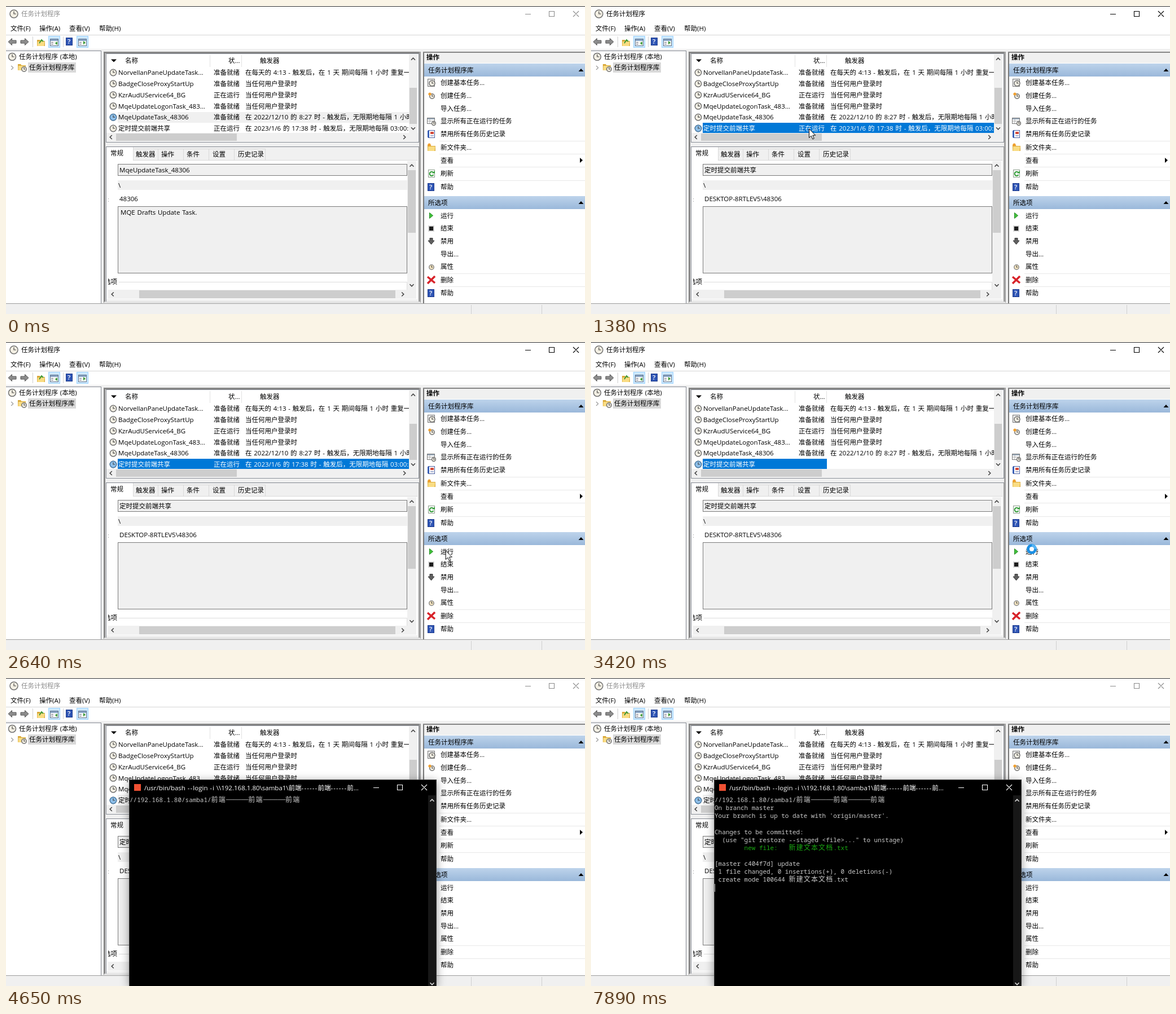
An HTML page for the animation above (8000 ms loop, 1026x546 px).

```html
<!DOCTYPE html>
<html lang="zh-CN">
<head>
<meta charset="utf-8">
<title>任务计划程序</title>
<style>
html, body { margin: 0; width: 100%; height: 100%; overflow: hidden; background: #fff; }
svg { display: block; width: 1026px; height: 546px; }
text { font: 11.5px "Open Sans", "Noto Sans CJK SC", "Noto Sans CJK", sans-serif; word-spacing: .8px; white-space: pre; }
.bold { font-weight: 600; }
.term text { font: 500 10.96px "Noto Sans Mono", "DejaVu Sans Mono", "Noto Sans CJK SC", "Noto Sans CJK", monospace; word-spacing: 0; }
.wide { font-size: 12px; letter-spacing: 1.15px; }
.dash { letter-spacing: 1.1px; }
.shadow { filter: drop-shadow(0 3px 8px rgba(0, 0, 0, .4)); }
.on { animation: 8s step-end infinite; }
#mouse { animation: mouse 8s linear infinite; }
@keyframes mouse {
  0%, 6% { transform: translate(1016px, 1px); animation-timing-function: cubic-bezier(.3, .1, .35, 1); }
  15.75%, 21.3% { transform: translate(386px, 217px); animation-timing-function: cubic-bezier(.4, 0, .6, .9); }
  27% { transform: translate(743px, 309px); animation-timing-function: cubic-bezier(.2, .5, .5, 1); }
  31.125%, 31.6% { transform: translate(787px, 378px); }
  34.125%, 36.2% { transform: translate(772px, 362px); }
  37.875%, 49.2% { transform: translate(780px, 367px); animation-timing-function: ease-in; }
  50.625%, 100% { transform: translate(930px, 548px); }
}
</style>
</head>
<body>
<svg id="stage" viewBox="0 0 1026 546"></svg>
<script>
const LOOP = 8000;
const sheet = [];

// Shows body only inside the given [start, end, start, end, ...] times in ms.
function on(times, body) {
  const name = 'show' + sheet.length;
  let keys = times[0] ? '0%{opacity:0}' : '';
  times.forEach((t, i) => { keys += `${t / LOOP * 100}%{opacity:${i % 2 && t < LOOP ? 0 : 1}}`; });
  sheet.push(`@keyframes ${name}{${keys}}`);
  return `<g class="on" style="animation-name:${name}">${body}</g>`;
}

const rect = (x, y, w, h, fill, extra = '') => `<rect x="${x}" y="${y}" width="${w}" height="${h}" fill="${fill}" ${extra}/>`;
const box = (x, y, w, h, fill, line) => rect(x + .5, y + .5, w - 1, h - 1, fill, `stroke="${line}"`);
const path = (d, stroke, width = 1, fill = 'none') => `<path d="${d}" stroke="${stroke}" stroke-width="${width}" fill="${fill}"/>`;
const fill = (d, color) => `<path d="${d}" fill="${color}"/>`;
const text = (x, mid, s, color = '#000', extra = '') =>
  `<text x="${x}" y="${mid + 4.2}" fill="${color}" ${extra}>${s.replace(/<(?!\/?tspan)/g, '&lt;')}</text>`;
const at = (x, y, body, scale = 1) => `<g transform="translate(${x} ${y}) scale(${scale})">${body}</g>`;

const clock = (x, y, r, face = '#f4f0e4', rim = '#707070') =>
  `<circle cx="${x}" cy="${y}" r="${r}" fill="${face}" stroke="${rim}" stroke-width="1.5"/>` +
  path(`M${x} ${y - r * .65}V${y}H${x + r * .55}`, '#444', 1.2);
const folder = (x, y) => at(x, y, fill('M-7-5h5l1.500 2h7.500v9h-14z', '#d9a93b') + fill('M-6-2h12.500l-1 8h-12z', '#f9dc83'));
const help = (x, y) => box(x - 6, y - 7, 12, 14, '#2f55b5', '#1d3a8c') +
  text(x - 3, y, '?', '#fff', 'class="bold"');
const panel = (x, y, mark) => box(x - 10, y - 11, 21, 21, '#cce8ff', '#99d1ff') +
  box(x - 7, y - 6, 15, 13, '#fff', '#5d6f86') + rect(x - 6, y - 5, 13, 3, '#8aa5c6') +
  rect(x - 5, y, 4, 1, '#667') + rect(x - 5, y + 3, 4, 1, '#667') + rect(x + 1, y - 1, 5, 6, '#e3eee0') + mark;
const chevron = (x, y, turn, color = '#454545') =>
  `<g transform="translate(${x} ${y}) rotate(${turn})">${path('M-3.5 1.8L0-1.8L3.5 1.8', color, 1.6)}</g>`;

function scrollbar(x, y, w, h, from, to) {
  const down = h > w, m = 8;
  return rect(x, y, w, h, '#f0f0f0') +
    (down ? rect(x + 1, from, w - 2, to - from, '#cdcdcd') : rect(from, y + 1, to - from, h - 2, '#cdcdcd')) +
    (down ? chevron(x + w / 2, y + m, 0) + chevron(x + w / 2, y + h - m, 180)
          : chevron(x + m, y + h / 2, -90) + chevron(x + w - m, y + h / 2, 90));
}

const winButtons = (min, max, close, y, c) =>
  path(`M${min - 5} ${y + .5}h10M${max - 4.5} ${y - 4.5}h9v9h-9zM${close - 5} ${y - 5}l10 10m0-10l-10 10`, c, 1.1);

function chrome() {
  const caption = c => text(27, 14, '任务计划程序', c) + winButtons(925, 967, 1010, 14, c);
  const arrow = 'M-7 0l6.5-6v3.5h7.5v5h-7.5v3.5z';
  return rect(0, 0, 1026, 546, '#fff') + rect(0, 0, 1026, 1, '#2b2b2b') +
    clock(14, 14, 7) + on([0, 1350, 4530, LOOP], caption('#8c8c8c')) + on([1350, 4530], caption('#000')) +
    ['文件(F)', '操作(A)', '查看(V)', '帮助(H)'].map((s, i) => text([8, 59, 112, 165][i], 40, s)).join('') +
    rect(0, 51, 1026, 1, '#d5d5d5') +
    at(11, 63.5, path(arrow, '#555', 1, '#8d8d8d')) + at(33, 63.5, path(arrow, '#555', 1, '#8d8d8d'), '-1 1') +
    rect(47, 54, 1, 19, '#cfcfcf') + rect(101, 54, 1, 19, '#cfcfcf') +
    folder(62, 65) + path('M59 66l4-6l3 3', '#3c9a36', 2) +
    panel(85, 64, fill('M87 66l4-3v6z', '#3c9a36')) + help(112, 63) + panel(135, 64, fill('M137 62l4 3l-4 3z', '#3c9a36')) +
    rect(0, 76, 1026, 452, '#f0f0f0') + rect(0, 79, 169, 1, '#828790') +
    rect(0, 80, 168, 447, '#fff') + rect(168, 80, 1, 447, '#828790') +
    clock(11, 90, 6.5) + text(23, 90, '任务计划程序 (本地)') +
    at(11, 109.5, path('M-1.8-3.5L1.8 0L-1.8 3.5', '#9a9a9a', 1.2)) +
    folder(28, 108) + clock(32, 112, 4.2) + rect(39, 100, 85, 18, '#d9d9d9') + text(41, 109, '任务计划程序库') +
    rect(0, 527, 1026, 1, '#9c9c9c') + rect(0, 528, 1026, 18, '#f0f0f0') +
    rect(824, 530, 1, 16, '#d0d0d0') + rect(949, 530, 1, 16, '#d0d0d0');
}

function list() {
  const mid = i => 118 + 19.8 * i;
  const rest = (i, status, trigger, c) => text(368, mid(i), status, c) + text(424, mid(i), trigger, c, 'clip-path="url(#cells)"');
  const ready = '准备就绪', busy = '正在运行', login = '当任何用户登录时';
  const rows = [
    ['NorvellanPaneUpdateTask...', ready, '在每天的 4:13 - 触发后，在 1 天 期间每隔 1 小时 重复一次'],
    ['BadgeCloseProxyStartUp', ready, login],
    ['KzrAudUService64_BG', busy, login],
    ['MqeUpdateLogonTask_483...', ready, login],
    ['MqeUpdateTask_48306', ready, '在 2022/12/10 的 8:27 时 - 触发后，无限期地每隔 1 小时'],
    ['定时提交前端共享', busy, '在 2023/1/6 的 17:38 时 - 触发后，无限期地每隔 03:00:00']
  ];
  const row = (i, c) => text(199, mid(i), rows[i][0], c) + rest(i, rows[i][1], rows[i][2], c);
  const tint = i => clock(190, mid(i), 5.7, '#8fc0ea', '#4d7ea8');
  const blue = '#0078d7';
  return rect(173, 81, 562, 446, '#f0f0f0') + rect(173, 81, 562, 3, '#868686') + rect(173, 81, 3, 445, '#868686') +
    rect(732, 81, 3, 445, '#a0a0a0') + rect(174, 524, 560, 2, '#dedede') +
    box(177, 84, 555, 158, '#fff', '#828790') +
    fill('M186 94.5h10l-5 5z', '#000') + text(211, 97, '名称') + text(394, 97, '状...') + text(450, 97, '触发器') +
    rect(361, 87, 1, 21, '#e2e2e2') + rect(417, 87, 1, 21, '#e2e2e2') +
    on([0, 1350], rect(198, 188, 516, 19, '#f0f0f0')) + on([4560, LOOP], rect(198, 207, 516, 18, '#f0f0f0')) +
    rows.map((r, i) => clock(190, mid(i), 5.7)).join('') + [0, 1, 2, 3, 4].map(i => row(i)).join('') +
    on([0, 1350], tint(4)) + on([1350, LOOP], tint(5)) +
    on([0, 1350, 4560, LOOP], row(5)) +
    on([1350, 4560], rect(198, 207, 220, 18, blue) + text(199, mid(5), rows[5][0], '#fff')) +
    on([1350, 3420, 3450, 4560], rect(418, 207, 296, 18, blue) + rest(5, rows[5][1], rows[5][2], '#fff')) +
    scrollbar(714, 86, 15, 139, 145, 209) + scrollbar(178, 225, 536, 15, 195, 409) + rect(714, 225, 16, 15, '#f0f0f0');
}

function details() {
  const tabs = [['触发器', 230], ['操作', 275], ['条件', 320], ['设置', 366], ['历史记录', 411]];
  const edge = '#7a7a7a';
  return rect(177, 249, 555, 1, '#828790') + rect(177, 250, 1, 274, '#828790') + rect(731, 250, 1, 274, '#a0a0a0') +
    rect(178, 273, 551, 247, '#fff') + rect(225, 273, 504, 1, '#d9d9d9') +
    rect(225, 253, 235, 1, '#d9d9d9') + [269, 314, 359, 404, 459].map(x => rect(x, 253, 1, 20, '#d9d9d9')).join('') +
    rect(178, 250, 47, 24, '#fff') + rect(225, 250, 1, 23, '#d9d9d9') + text(185, 261, '常规') +
    tabs.map(([s, x]) => text(x, 263, s)).join('') +
    box(198, 280, 513, 21, '#f0f0f0', edge) + rect(198, 309, 513, 17, '#f0f0f0') + text(199, 318, '\\') +
    text(180, 343, ':', '#aaa') + box(198, 355, 513, 119, '#f0f0f0', edge) +
    on([0, 1380], text(201, 291, 'MqeUpdateTask_48306') + text(201, 342, '48306') + text(203, 366, 'MQE Drafts Update Task.')) +
    on([1380, LOOP], text(201, 291, '定时提交前端共享') + text(201, 342, 'DESKTOP-8RTLEV5\\48306')) +
    text(174, 489, '选项', '#000', 'clip-path="url(#page)"') + path('M200 489.5H710.5V503', '#dcdcdc') +
    scrollbar(711, 275, 16, 228, 291, 402) + scrollbar(181, 503, 530, 16, 236, 690) + rect(711, 503, 16, 16, '#f0f0f0');
}

function actions() {
  const band = (y, s) => rect(741, y, 285, 23, 'url(#band)') +
    text(748, y + 12, s) + fill(`M1014.5 ${y + 14}h9l-4.5-5z`, '#000');
  const items = [[136, '创建基本任务...'], [158.5, '创建任务...'], [181.5, '导入任务...'], [204, '显示所有正在运行的任务'],
    [227, '禁用所有任务历史记录'], [250.5, '新文件夹...'], [273.5, '查看'], [297, '刷新'], [321, '帮助'],
    [371.5, '运行'], [394, '结束'], [417, '禁用'], [440, '导出...'], [462, '属性'], [485.5, '删除'], [509, '帮助']];
  const star = (x, y) => `<circle cx="${x}" cy="${y}" r="2.6" fill="#f0a030"/>`;
  return rect(740, 81, 286, 446, '#fff') + rect(740, 83, 286, 18, '#f0f0f0') + rect(739, 81, 2, 446, '#777') + rect(739, 81, 287, 2, '#868686') +
    text(745, 91, '操作', '#000', 'class="bold"') + band(102, '任务计划程序库') + band(337, '所选项') +
    [239, 262, 285, 309, 474, 497].map(y => rect(768, y, 258, 1, '#e8e8e8')).join('') +
    items.map(([y, s]) => text(770, y, s)).join('') + fill('M1017 269v9l5-4.5z', '#000') +
    box(747, 129, 13, 14, '#ececec', '#777') + clock(755, 137, 5) +
    clock(755, 160, 4.2) + star(751, 156) +
    box(746, 198, 14, 11, '#fff', '#777') + rect(747, 199, 12, 2, '#9ab') + path('M747 204h12M751 201v7', '#aaa') + clock(758, 208, 3.4) +
    box(748, 220, 12, 14, '#fff', '#4a5fa0') + rect(747, 221, 3, 12, '#3c62b8') + rect(752, 223, 6, 4, '#d34a3a') + path('M752 230h6', '#4a5fa0') +
    folder(754, 251) + star(750, 246) +
    box(748, 290, 12, 14, '#fff', '#8a9a8a') + path('M757 295a3.6 3.6 0 1 0 .5 4', '#2f9a35', 2) + fill('M755 296.5h5v-4.5z', '#2f9a35') +
    help(753, 321) +
    path('M750.5 366.5v10l6-5z', '#1f8a1f', 1, '#43c23c') +
    box(748, 389, 11, 11, '#c4c4c4', '#ddd') + rect(750, 391, 7, 7, '#1c1c1c') +
    path('M751 411.5h5v4.5h3l-5.5 6.5l-5.5-6.5h3z', '#333', 1, '#606060') +
    clock(754, 463, 4.2, '#f6e6c0', '#8a8a8a') +
    path('M747 480l13 11M760 479l-13 13', '#d8232a', 3.6) + help(753, 509);
}

function terminal() {
  const cell = 6.576, left = 219, gray = '#cacaca', green = '#1aa812';
  const line = (n, s, c = gray, col = 0) => text(left + col * cell, 216 + 14.1 * n, s, c);
  const wide = s => `<tspan class="wide">${s}</tspan>`;
  const caret = (y, ...times) => on(times, rect(219, y, 1, 14, '#d0d0d0'));
  const front = wide('前端'), rule = '──────', file = wide('新建文本文档') + '.txt';
  const title = '/usr/bin/bash --login -i \\\\192.168.1.80\\samba1\\前端------前端------前...';
  return rect(218, 180, 545, 366, '#000', 'class="shadow"') + rect(748, 208, 14, 338, '#171717') +
    path('M218.5 546V180.5H762.5V546', '#3a3a3a') + rect(227, 188, 12, 12, '#f05133') +
    text(245, 194.5, title.replace(/-+/g, '<tspan class="dash">$&</tspan>'), '#fff') +
    winButtons(656, 698, 741, 194, '#fff') + chevron(755, 217, 0, '#ddd') + chevron(755, 542, 180, '#ddd') +
    '<g class="term">' + line(0, `//192.168.1.80/samba1/${front}${rule}${front}${rule}${front}`) +
    on([5670, LOOP], line(1, 'On branch master') + line(2, "Your branch is up to date with 'origin/master'.") +
      line(4, 'Changes to be committed:') + line(5, '(use "git restore --staged <file>..." to unstage)', gray, 2) +
      line(6, 'new file:', green, 8) + line(6, file, green, 20)) +
    on([6360, LOOP], line(8, '[master c404f7d] update') + line(9, '1 file changed, 0 insertions(+), 0 deletions(-)', gray, 1) +
      line(10, 'create mode 100644', gray, 1) + line(10, file, gray, 20)) + '</g>' +
    caret(224, 4920, 5310) + caret(323, 5670, 6000) + caret(365, 6360, 6750, 7110, 7500, 7890, LOOP);
}

function pointer() {
  const arrow = path('M.5.8V16.5L4.2 13.2L6.8 19L9.3 17.9L6.8 12.2H11.7Z', '#000', 1, '#fff');
  const ring = '<circle cx="781" cy="367" r="6.5" fill="#fff" stroke="#1b8fe3" stroke-width="5"/>' +
    path('M781 360.5a6.5 6.5 0 0 1 6.5 6.5', '#55b4f4', 4);
  return on([480, 3420, 3450, 4050], `<g id="mouse">${arrow}</g>`) + on([3420, 3450], ring);
}

const defs = `<defs>
  <linearGradient id="band" x2="0" y2="1"><stop stop-color="#bdd3eb"/><stop offset="1" stop-color="#9ab8da"/></linearGradient>
  <clipPath id="cells"><rect x="418" y="86" width="296" height="139"/></clipPath>
  <clipPath id="page"><rect x="181" y="274" width="530" height="229"/></clipPath>
</defs>`;

const stage = document.getElementById('stage');
const art = defs + chrome() + list() + details() + actions() + on([4650, LOOP], terminal()) + pointer();
const style = document.createElement('style');
style.textContent = sheet.join('\n');
document.head.append(style);
stage.innerHTML = art;
</script>
</body>
</html>
```
